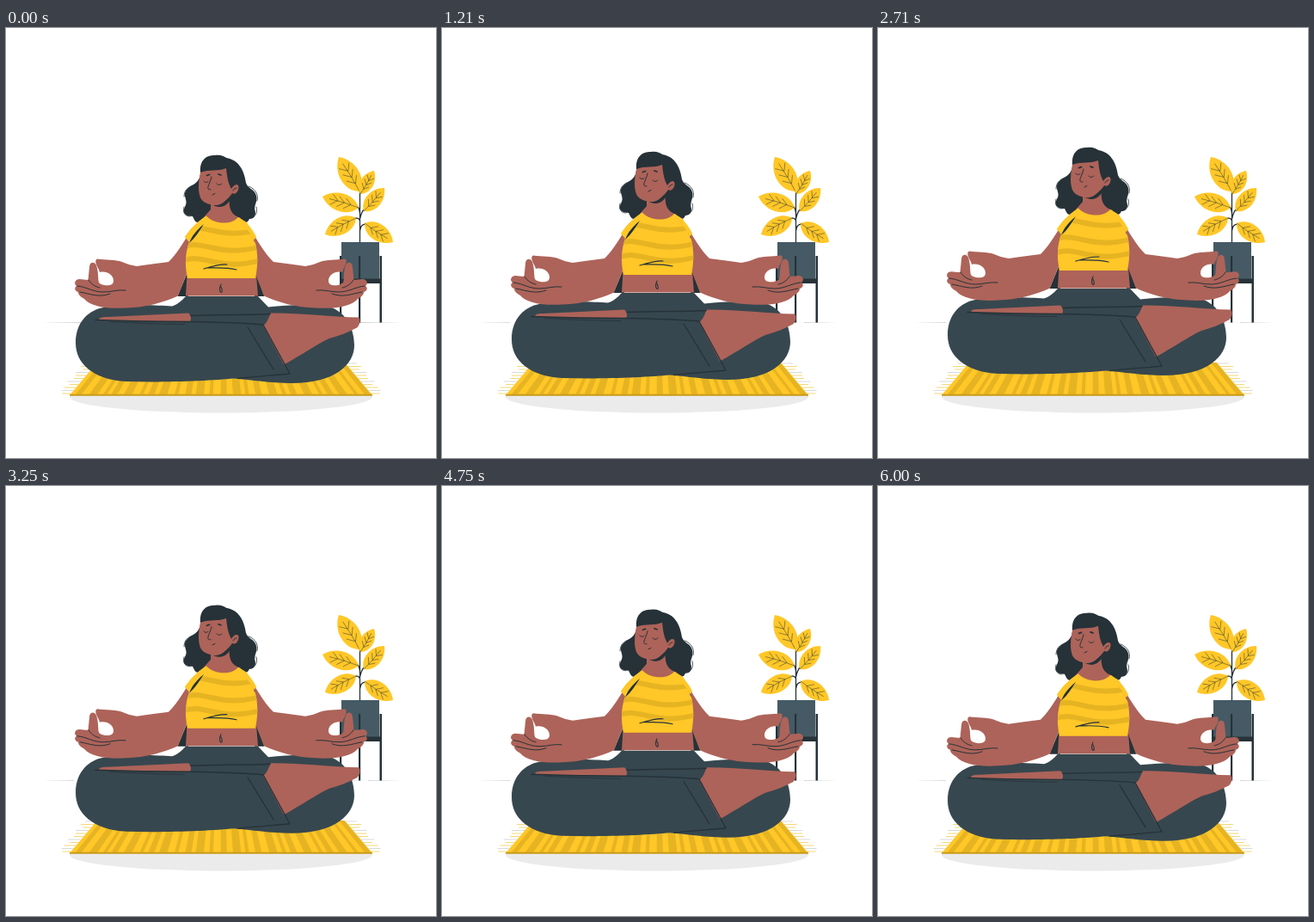
These frames come from a looping animation (500 by 500 pixels, 6040 ms). An HTML page:

```html
<!DOCTYPE html>
<html lang="en">
<head>
<meta charset="utf-8">
<title>Meditation</title>
<style>
  html, body { margin: 0; width: 100%; height: 100%; overflow: hidden; background: #fff; }
  svg { display: block; width: 100%; height: 100%; }
  .skin { fill: #ad6359; }
  .dark { fill: #263238; }
  .pants { fill: #37474f; }
  .yellow { fill: #ffc727; }
  .shade { fill: #e6b422; }
  .line { fill: none; stroke: #263238; stroke-linecap: round; stroke-linejoin: round; }
</style>
</head>
<body>
<svg viewBox="0 0 500 500">
  <defs>
    <clipPath id="shirtClip">
      <path id="shirtShape" d="M233 218.500C242 229 263 229 270 220L280 226L291 243L288 247L290 250C293 263 293 276 290 291H211C208 276 208 263 213 249L208 243C214 234 223 225 233 218.500Z"/>
    </clipPath>
    <g id="arm">
      <path class="skin" d="M217 232C208 246 201 260 189 272C176 274 163 275 152 277C145 276 140 274 135 272C127 269 117 270 106 268.500C103 270 104 274 108 281L109 284C117 282 125 287 125 294C125 299 119 300 114 299C110 298 108 297 107.500 294C107 287 107 281 105 276C103 271 97 272 97 278L95.500 293C90 293 85 291 82 293C79 296 80 298 82 300C79 302 80 306 84 307C84 311 88 313 91 315C99 324 118 327 140 325.500C162 325 184 319 200 311.500L210 286L214 265Z"/>
      <path class="line" stroke-width="1" d="M83 300C94 301 101 307 113 307C123 307 129 304 139 305M86 307C98 309 108 314 121 309M96 293C99 298 104 301 109 302"/>
    </g>
  </defs>

  <path class="dark" d="M41 342.500L251 342.100L462 342.500L251 342.900Z"/>
  <ellipse cx="250" cy="429" rx="176" ry="18.500" fill="#ebebeb"/>

  <g id="plant">
    <rect x="390" y="249" width="44" height="43" fill="#455a64"/>
    <path class="dark" d="M388 265h2.200V342.500H388ZM410 265h2.200V342.500H410ZM434.500 265H437V342.500h-2.500ZM389 291.500H436V297H389Z"/>
    <path class="line" stroke-width="1.300" d="M411.500 249V188M411.500 222C413 215 414 213 417 210M411.500 215C411 209 409 207 404 204M411.500 224C410 220 407 221 402 222M411.500 236C412 230 415 227 420 229"/>
  </g>

  <g id="mat">
    <g id="fringe" stroke-width="1.100"></g>
    <path class="yellow" d="M106 389H394L426 427H74Z"/>
    <g id="stripes" class="shade"></g>
    <path d="M74 426.800H426" stroke="#c99a16" stroke-width="2"/>
  </g>

  <g id="woman">
    <path class="dark" d="M211 284L199.500 312H212ZM290 284L300.500 312H289Z"/>

    <path class="pants" d="M209 312H293L305 324.500C330 321.500 360 321 377 324.500C396 331 405 350 405 369C405 391 383 413 332 413C308 413 285 409 265 407.500C240 410 185 412.500 140 411C101 409 81 390 81 366C81 341 97 328 113 325C140 321 175 322 193 323.500C201 321 205 316 209 312Z"/>
    <path class="skin" d="M109 340C107 337 110 336 118 336L212 331.500C215 334 216 338 214 341.500Z"/>
    <path class="skin" d="M308 331.500C340 331 378 336 410 336.500C413 340 411 346 408 348.500C398 354 387 358 376 361C361 368 344 380 323 391.500L299 346C304 343 305 337 308 331.500Z"/>
    <path class="line" stroke-width="1.300" d="M215 334.500C245 333 278 334 307 332.500M104 339.500C145 341 180 341.500 213 341.500C245 342 275 343 299 345L330 402C310 404 292 405 270 407.500M281 348L311 397"/>
    <path class="line" stroke-width=".8" d="M120 341.500C150 343 180 344.500 208 344.500"/>

    <use href="#arm"/>
    <use href="#arm" transform="translate(500) scale(-1 1)"/>

    <path class="skin" d="M210.500 287H291L293 311.500H209Z"/>
    <path class="line" stroke-width="1.100" d="M250 298C248 302 248 307 250.500 307.500C252 307 251 303 250 301"/>

    <path class="dark" d="M226 170C224 184 211 182 208 192C207 198 212 201 208 208C204 216 210 219 217 219C219 223 220 226 223 226L235 218L262 214C266 221 270 224 275 224C278 227 281 227 283 222C289 222 291 217 289.500 212C288 206 293 202 291 195C289 187 281 187 279 180C277 165 270 153 256 151C250 147 230 145 226 170Z"/>
    <path class="line" stroke-width=".8" d="M222 182C214 183 207 187 207 196M207 208C205 216 209 219 214 219M282 184C290 187 294 194 292 201M291 208C293 215 290 220 284 221"/>
    <path class="skin" d="M238 198V211L230 220C240 234 264 232 273 221C262 217 259 212 259.500 194Z"/>
    <path class="dark" d="M241 206C250 207 255 202 260 194V201C255 208 249 210 241 206Z"/>

    <use href="#shirtShape" class="yellow"/>
    <g id="waves" clip-path="url(#shirtClip)" fill="none" stroke="#e6b422" stroke-width="6"></g>
    <path class="dark" d="M230 228C223 233 217 240 213 250C220 244 225 236 230 228ZM276 228C281 233 286 240 290 250C287 240 282 233 276 228Z"/>
    <path class="yellow" d="M232 219C223 225 214 234 208 243L213 247C218 239 225 232 231 227ZM270 220C280 226 287 234 291 243L288 246C284 238 279 231 272 226Z"/>
    <path class="line" stroke-width="1.200" d="M230 280C240 277 248 274.500 257 275M234 279C246 279 256 278 268 281"/>

    <path class="skin" d="M227 164C223 179 223 193 227 199C232 206 245 208 252 203C258 199 261 195 263 192C268 195 272 187 270 183C267 180 264 183 262 186L258 160Z"/>
    <path class="dark" d="M226 168C225 153 233 148 243 148C249 147 254 149 257 152L270 161L272 183C267 180 264 184 262 187C258 180 257 172 256 163C246 167 237 164 226 168Z"/>
    <path class="line" stroke-width="1.800" d="M233.500 171.500L236.500 170.500M247 170L250 171"/>
    <path class="line" stroke-width="1" d="M230 178C231 180 233 180 235 178.500M245 181C247 183 249 183 251 181M239 173C238 179 234 184 235 187C236 188 237 188 238 188M240 194L243 192.500M264 189C265 187 267 186 268 186"/>
  </g>
</svg>

<script>
const svgNS = "http://www.w3.org/2000/svg";
const byId = id => document.getElementById(id);

function add(parent, d, attrs = {}) {
  const path = document.createElementNS(svgNS, "path");
  path.setAttribute("d", d);
  for (const key in attrs) path.setAttribute(key, attrs[key]);
  parent.appendChild(path);
}

// Two cubic edges join base and tip; veins leave the midrib towards the tip.
function leaf([bx, by], [tx, ty], width) {
  const dx = tx - bx, dy = ty - by;
  const at = (along, side) =>
    `${(bx + dx * along - dy * side).toFixed(1)} ${(by + dy * along + dx * side).toFixed(1)}`;
  const base = at(0, 0), tip = at(1, 0);
  add(byId("plant"),
    `M${base}C${at(.2, width)} ${at(.72, width)} ${tip}C${at(.72, -width)} ${at(.2, -width)} ${base}Z`,
    { class: "yellow" });
  let veins = `M${base}Q${at(.4, .03)} ${at(.8, 0)}`;
  for (let k = .22; k < .7; k += .18) {
    const side = width * .42;
    veins += `M${at(k + .16, side)}L${at(k, .02)}L${at(k + .16, -side)}`;
  }
  add(byId("plant"), veins, { class: "line", "stroke-width": .5 });
}

leaf([411, 190], [387, 150], .33);
leaf([412, 193], [428, 166], .33);
leaf([410, 209], [368, 196], .32);
leaf([416, 213], [440, 186], .33);
leaf([407, 221], [371, 240], .32);
leaf([417, 227], [450, 249], .33);

// Mat stripes converge slightly towards the back edge.
const backX = x => 250 + (x - 250) * 144 / 176;
for (let i = 0, x = 80; x < 420; i++) {
  const width = 7 + 3 * Math.sin(i * 2.1);
  add(byId("stripes"), `M${x} 427L${backX(x)} 389H${backX(x + width)}L${x + width} 427Z`);
  x += width + 7 + 2 * Math.cos(i * 1.7);
}

for (let i = 0; i < 11; i++) {
  const y = 390 + i * 3.5, edge = 106 - (y - 389) * 32 / 38;
  const length = 13 + 3 * Math.sin(i * 2.4);
  add(byId("fringe"), `M${edge} ${y}h${-length}M${500 - edge} ${y}h${length}`,
    { stroke: i % 3 ? "#f5d777" : "#d9d9d9" });
}

for (const y of [236, 256, 272]) {
  add(byId("waves"), `M203 ${y}C216 ${y - 7} 229 ${y - 3} 242 ${y}S270 ${y + 5} 297 ${y - 2}`);
}

const period = 6040, lift = 10;

function render(time) {
  const phase = time % period / period;
  const rise = lift * (1 - Math.abs(1 - 2 * phase));
  byId("woman").setAttribute("transform", `translate(0 ${-rise.toFixed(3)})`);
}

const start = performance.now();
function tick() {
  render(performance.now() - start);
  requestAnimationFrame(tick);
}
tick();
</script>
</body>
</html>
```
